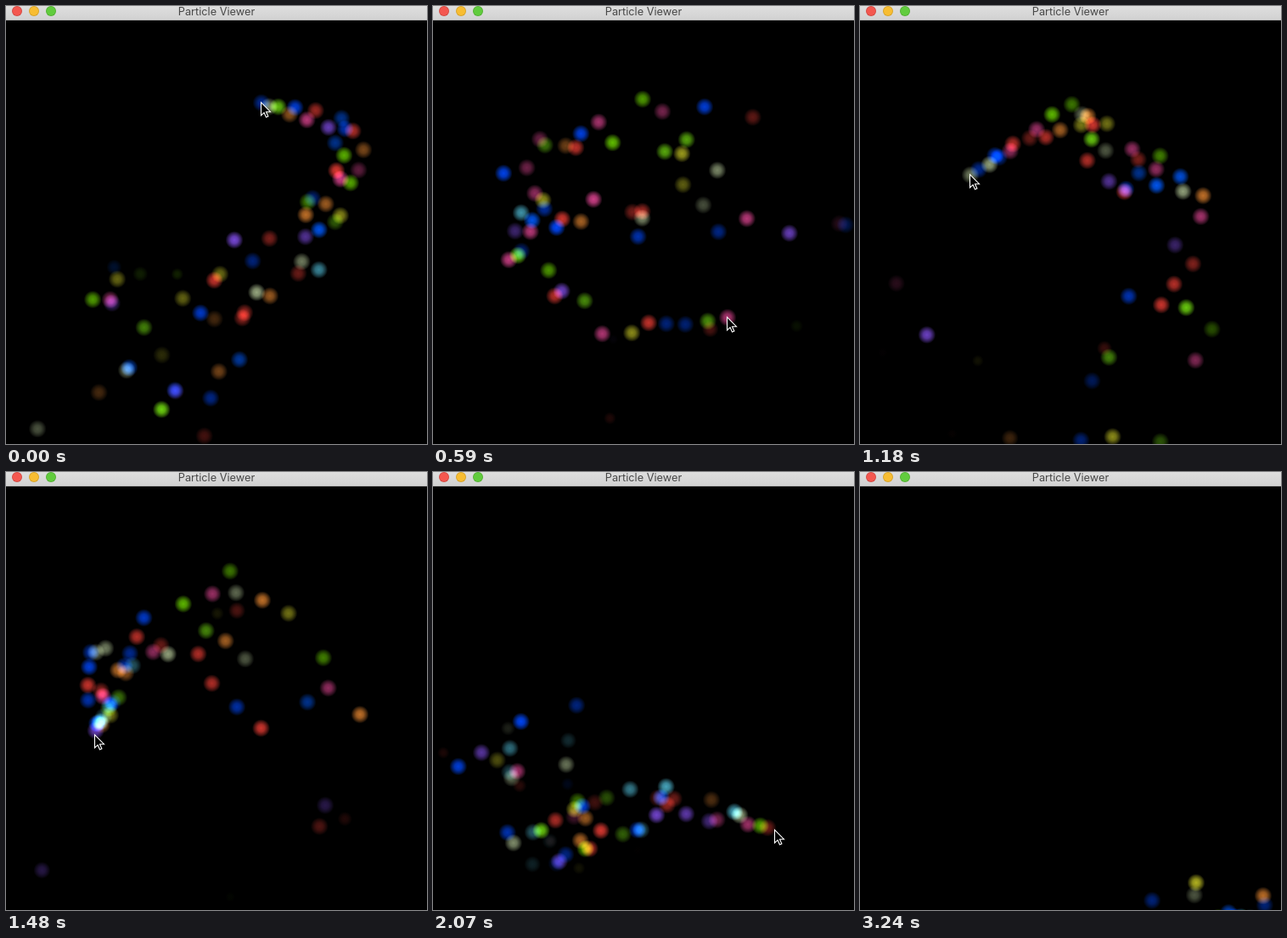
Recreate the animation shown at these times as an HTML page with a canvas. Size 496 px wide and 516 px high, loop 3340 ms.

```html
<!DOCTYPE html>
<html lang="en">
<head>
<meta charset="utf-8">
<title>Particle Viewer</title>
<style>
  html, body { margin: 0; width: 100%; height: 100%; overflow: hidden; background: #000; }
  canvas { position: absolute; left: 0; top: 0; }
  header {
    position: absolute; left: 0; top: 0; width: 496px; height: 16px;
    background: linear-gradient(#dedede, #d2d2d2); border-bottom: 1px solid #b4b4b4;
    font: 12.75px/13px Inter, Roboto, sans-serif; color: #484848; text-align: center;
  }
  i { position: absolute; top: 0; width: 12px; height: 12px; border-radius: 50%; box-shadow: inset 0 0 0 1px #0002; }
</style>
</head>
<body>
<canvas id="view" width="496" height="516"></canvas>
<header>
  <i style="left:7px;background:#f4574f"></i>
  <i style="left:27px;background:#f8bd32"></i>
  <i style="left:47px;background:#61cc3d"></i>
  Particle Viewer
</header>
<script>
const ctx = document.getElementById('view').getContext('2d');
const LOOP = 3340, TICK = 3240 / 22; // ms; the picture advances once per tick
const GRAVITY = 430, SPEED = 165, RADIUS = 10.5, PER_TICK = 11;

// Pointer key points: tick, x, y
const path = [
  [-7, 120, 180], [-5.5, 80, 290], [-4, 190, 345], [-2, 375, 245], [-1, 415, 150],
  [0, 301, 114], [2, 125, 190], [3, 105, 295], [3.5, 215, 382], [4, 347, 367],
  [5, 385, 200], [7, 235, 128], [8, 130, 199], [10, 105, 310], [11.8, 160, 376],
  [12, 195, 396], [13, 285, 385], [14, 403, 422], [16, 418, 435], [18, 440, 505],
  [19, 440, 532], [23, 445, 530]
];
const colors = ['#0048ff', '#0058f8', '#70dc00', '#d83830', '#0048ff', '#70d810', '#d83830',
  '#d04088', '#7848d8', '#48a8c0', '#c07028', '#b0b020', '#98a880'];

let seed = 20;
function rand() {
  seed = (seed * 1664525 + 1013904223) >>> 0;
  return seed / 4294967296;
}
const mix = (a, b, u) => a + (b - a) * u;

function pointerAt(tick) {
  const k = Math.max(1, path.findIndex(p => p[0] >= tick));
  const a = path[k - 1], b = path[k], u = (tick - a[0]) / (b[0] - a[0]);
  return [mix(a[1], b[1], u), mix(a[2], b[2], u)];
}

// The pointer sheds particles at a steady rate, also before the loop begins
const particles = [];
for (let born = -7; born < 22; born += 1 / PER_TICK) {
  const [x, y] = pointerAt(born);
  const angle = rand() * 2 * Math.PI, speed = SPEED * Math.sqrt(rand());
  particles.push({
    born, x, y,
    vx: speed * Math.cos(angle), vy: speed * Math.sin(angle),
    life: mix(0.45, 1.1, rand()), glow: mix(0.4, 1, rand()),
    color: colors[Math.floor(rand() * colors.length)]
  });
}

function drawParticle(p, tick) {
  const age = (tick - p.born) * TICK / 1000, left = 1 - age / p.life;
  if (age < 0 || left <= 0) return;
  const x = p.x + p.vx * age;
  const y = p.y + p.vy * age + GRAVITY * age * age / 2;
  const r = RADIUS * Math.min(1, 0.5 + left * 5);
  const g = ctx.createRadialGradient(x, y, 0, x, y, r);
  g.addColorStop(0, p.color);
  g.addColorStop(0.4, p.color + 'd0');
  g.addColorStop(0.75, p.color + '60');
  g.addColorStop(1, p.color + '00');
  ctx.globalAlpha = p.glow * Math.min(1, left * 4);
  ctx.fillStyle = g;
  ctx.fillRect(x - r, y - r, 2 * r, 2 * r);
}

const arrow = new Path2D('M0 0V15.5L3.6 12.2L6 17.5L8.4 16.5L6 11.2H11Z');
function drawPointer(tick) {
  const [x, y] = pointerAt(tick);
  ctx.save();
  ctx.translate(Math.round(x) - 0.5, Math.round(y) - 0.5);
  ctx.fillStyle = '#000';
  ctx.strokeStyle = '#fff';
  ctx.lineWidth = 1.1;
  ctx.fill(arrow);
  ctx.stroke(arrow);
  ctx.restore();
}

function draw(now) {
  const tick = Math.min(22, Math.floor((now % LOOP + 8) / TICK));
  ctx.globalAlpha = 1;
  ctx.globalCompositeOperation = 'source-over';
  ctx.fillStyle = '#000';
  ctx.fillRect(0, 0, 496, 516);
  ctx.globalCompositeOperation = 'lighter';
  particles.forEach(p => drawParticle(p, tick));
  ctx.globalAlpha = 1;
  ctx.globalCompositeOperation = 'source-over';
  drawPointer(tick);
  requestAnimationFrame(draw);
}
requestAnimationFrame(draw);
</script>
</body>
</html>
```
